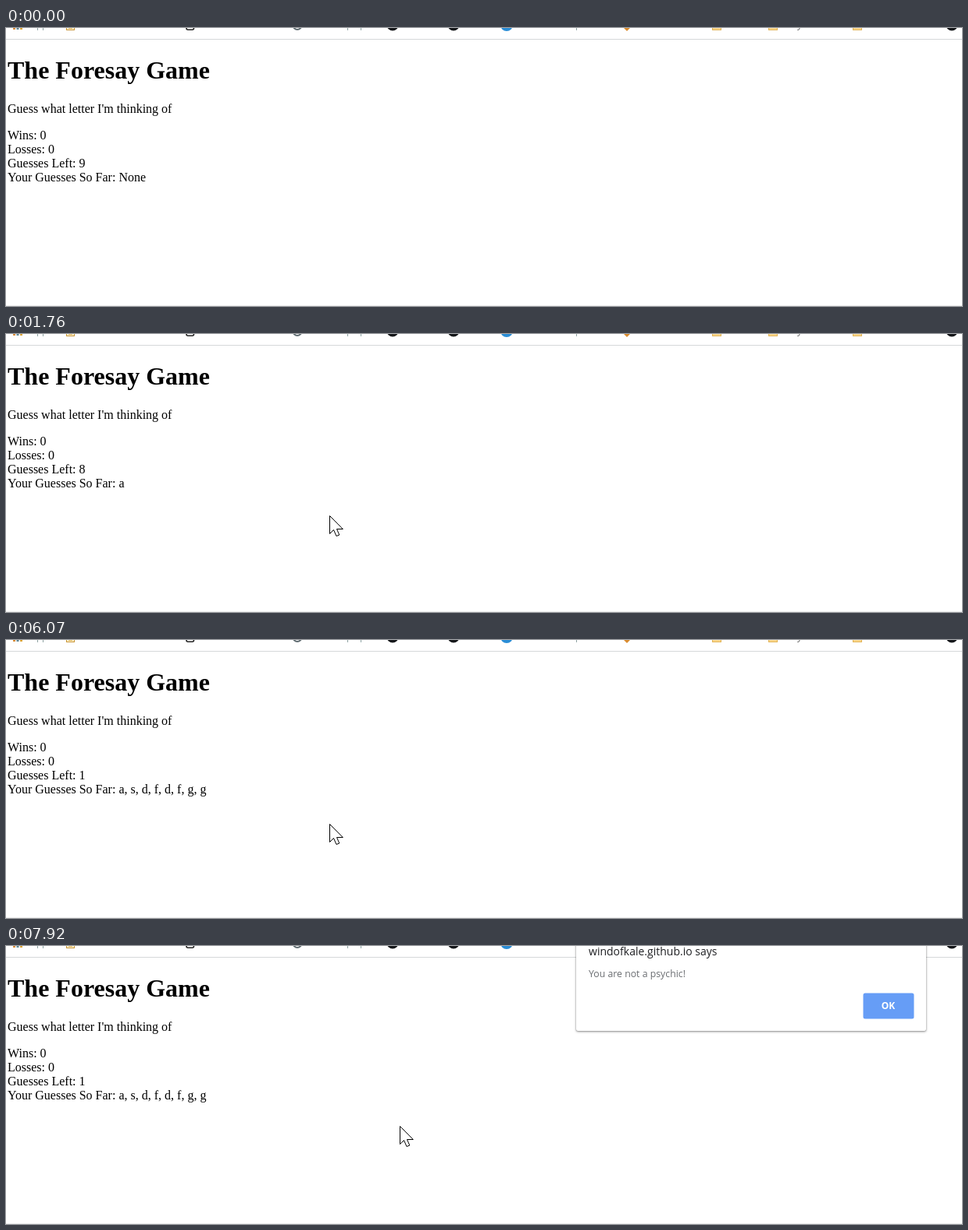
An HTML page with a canvas for the animation above (8 s loop, 1224 by 357 pixels).

```html
<!DOCTYPE html>
<html lang="en">
<head>
<meta charset="utf-8">
<title>Letter guessing</title>
<style>
  html, body { margin: 0; width: 100%; height: 100%; overflow: hidden; background: #fff; }
  canvas { position: absolute; left: 0; top: 0; }
  #dialog {
    position: absolute; left: 730px; top: -20px; width: 448px; height: 129px;
    background: #fff; border-radius: 2px; visibility: hidden;
    box-shadow: 0 0 1px rgba(0, 0, 0, .5), 0 1px 3px rgba(0, 0, 0, .45);
  }
  #dialog svg { display: block; font-family: "Open Sans", sans-serif; }
</style>
</head>
<body>
<canvas id="stage" width="1224" height="357"></canvas>
<div id="dialog">
  <svg width="448" height="129">
    <text x="16" y="32" font-size="14" fill="#202124">windofkale.github.io says</text>
    <text x="16" y="60" font-size="12.3" fill="#6a6d71">You are not a psychic!</text>
    <rect x="367.5" y="80.5" width="65" height="33" rx="2.5" fill="#669df6"/>
    <text x="399.5" y="101" font-size="12" font-weight="700" fill="#fff" text-anchor="middle">OK</text>
  </svg>
</div>
<script>
const LOOP = 8000;
const ctx = document.getElementById('stage').getContext('2d');
const dialog = document.getElementById('dialog');

// Each track holds [start time, ...values]; a value stays until the next entry.
const pointer = [
  [230, 1047, 349], [310, 830, 302], [380, 672, 270], [460, 573, 254],
  [530, 513, 247], [610, 474, 242], [690, 452, 239], [770, 442, 238],
  [920, 421, 234], [1000, 414, 233], [3450, 414, 236], [7920, 504, 231]
];
const clicks = [[1300, 1380], [5660, 5750]];
const guesses = [[0, 9, 'None'], [1760, 8, 'a'], [2540, 7, 'a, s'], [6070, 1, 'a, s, d, f, d, f, g, g']];
// opacity, vertical shift, tilt in degrees, scale
const opening = [[7460, .53, -11.5, 2.3, 1.004], [7530, .86, -3, .6, 1.001], [7610, 1, 0, 0, 1]];

const current = (track, t) => track.filter(step => step[0] <= t).pop();

function text(str, x, y, font = '16px "Liberation Serif", "Times New Roman", serif', color = '#000') {
  ctx.font = font;
  ctx.fillStyle = color;
  ctx.fillText(str, x, y);
}

function rect(color, x, y, w, h) {
  ctx.fillStyle = color;
  ctx.fillRect(x, y, w, h);
}

function disc(color, x, y, r) {
  ctx.fillStyle = color;
  ctx.beginPath();
  ctx.arc(x, y, r, 0, Math.PI * 2);
  ctx.fill();
}

function polygon(points) {
  ctx.beginPath();
  points.forEach(([x, y]) => ctx.lineTo(x, y));
  ctx.closePath();
}

function drawBookmarks() {
  ['#d98d3a', '#5f8796', '#dda63a'].forEach((c, i) => rect(c, 9 + i * 4.5, 0, 3, 2));
  for (const x of [40, 47, 437, 454, 730]) rect('#8fa3a3', x, 0, 1, 3);

  rect('#c89435', 77, 0, 11, 3);
  rect('#fff3cf', 78, 0, 9, 2);
  rect('#e3b85c', 80, 0, 5, 1);

  ctx.lineWidth = 1.6;
  ctx.strokeStyle = '#222';
  ctx.beginPath();
  ctx.roundRect(231, -7, 9.5, 9.2, 2);
  ctx.stroke();

  ctx.lineWidth = 2;
  ctx.strokeStyle = '#5f6b70';
  ctx.beginPath();
  ctx.arc(373, -3.5, 5.5, 0, Math.PI * 2);
  ctx.stroke();

  for (const x of [495, 573, 1211]) disc('#16181b', x, -4, 7.5);
  disc('#2a8dd6', 641, -4, 8);

  ctx.fillStyle = '#d98b2f';
  polygon([[795, -6], [800, -1], [795, 4], [790, -1]]);
  ctx.fill();

  for (const x of [904, 976, 1084]) {
    rect('#e2b458', x, 0, 12, 3);
    rect('#fbd88c', x + 1, 0, 10, 2);
  }
  text('y', 1013, 0, '12px "Open Sans", sans-serif', '#666');
}

function drawPage(t) {
  const [, left, letters] = current(guesses, t);
  rect('#fff', 0, 0, 1224, 357);
  drawBookmarks();
  rect('#d6d8da', 0, 14, 1224, 1);
  rect('#efefef', 0, 356, 1224, 1);

  text('The Foresay Game', 2, 65, 'bold 32px "Liberation Serif", "Times New Roman", serif');
  text("Guess what letter I'm thinking of", 2, 109);
  ['Wins: 0', 'Losses: 0', 'Guesses Left: ' + left, 'Your Guesses So Far: ' + letters]
    .forEach((line, i) => text(line, 2, 143 + i * 18));
}

function drawPointer(t) {
  const step = current(pointer, t);
  if (!step) return;
  const [, x, y] = step;
  ctx.save();
  ctx.translate(x, y);
  polygon([[.5, .5], [.5, 23.5], [5.5, 18.5], [9, 26.5], [12.8, 25], [9.5, 17.5], [17.3, 17.5]]);
  ctx.fillStyle = '#fff';
  ctx.fill();
  ctx.lineWidth = 1;
  ctx.strokeStyle = '#000';
  ctx.stroke();
  if (clicks.some(([from, to]) => t >= from && t < to)) disc('rgba(255, 255, 0, .5)', 0, 0, 18);
  ctx.restore();
}

function placeDialog(t) {
  const step = current(opening, t);
  dialog.style.visibility = step ? 'visible' : 'hidden';
  if (!step) return;
  const [, opacity, shift, tilt, scale] = step;
  dialog.style.opacity = opacity;
  dialog.style.transform = tilt
    ? `translateY(${shift}px) perspective(1000px) rotateX(${tilt}deg) scale(${scale})`
    : 'none';
}

function render() {
  const t = performance.now() % LOOP;
  drawPage(t);
  drawPointer(t);
  placeDialog(t);
  requestAnimationFrame(render);
}
render();
</script>
</body>
</html>
```
